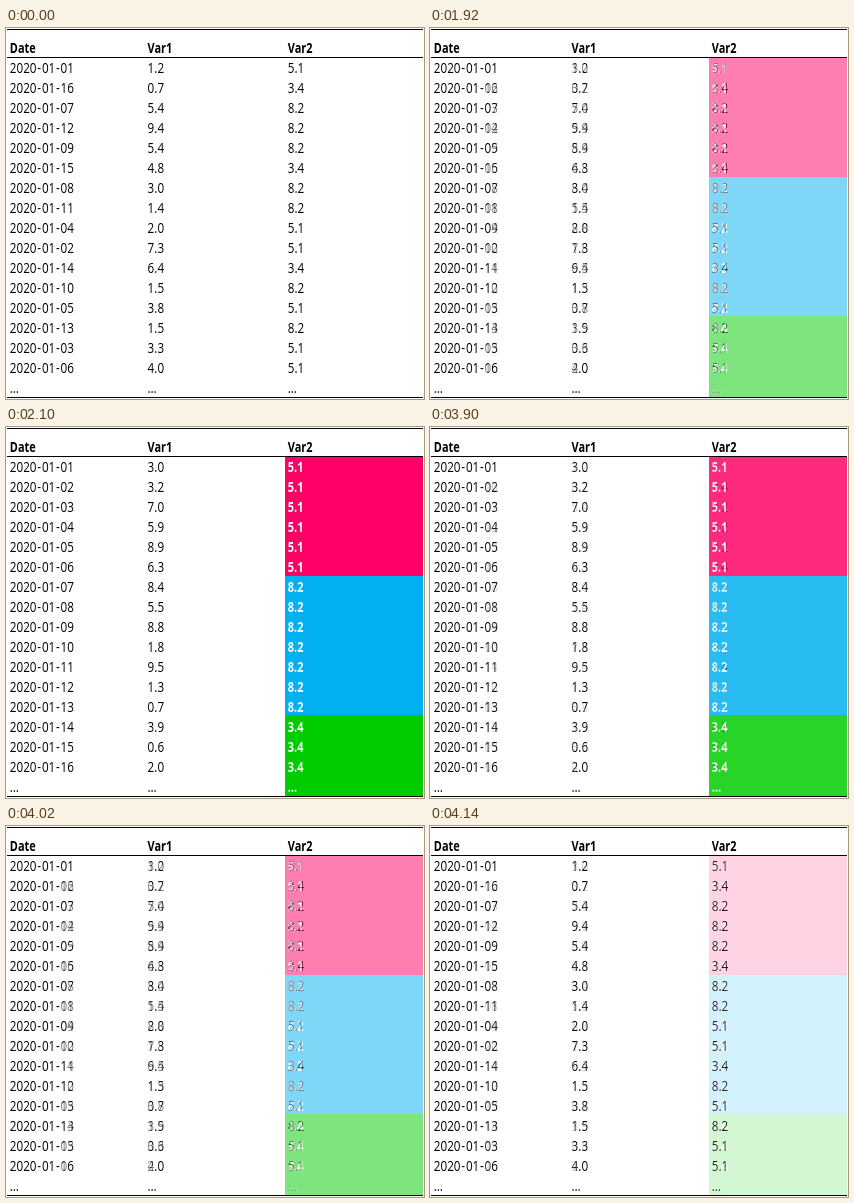
An HTML page for the animation above (4.2 s loop, 418 px wide and 371 px high).

```html
<!DOCTYPE html>
<html lang="en">
<head>
<meta charset="utf-8">
<title>Table sorted and grouped</title>
<style>
  html, body { margin: 0; width: 100%; height: 100%; overflow: hidden; background: #fff; }
  svg { display: block; width: 100%; height: 100%; }
  text { font: 14.6px "Open Sans", "Noto Sans", sans-serif; fill: #000; }
  .bold { font-weight: 700; }
  .light { fill: #fff; }
</style>
</head>
<body>
<svg id="stage" viewBox="0 0 418 371"></svg>
<script>
const NS = "http://www.w3.org/2000/svg";
const stage = document.getElementById("stage");
const COLS = [3.8, 141.6, 281.8];
const ROW = 20, ROWS = 16, FIRST = 45;
const LOOP = 4200, HOLD = 1800, BACK = 3900, STEP = 60, STEPS = 6;

// Seeded generator, values in 0..1.
function seeded(seed) {
  return () => {
    seed = (Math.imul(seed, 1664525) + 1013904223) >>> 0;
    return seed / 2 ** 32;
  };
}

const random = seeded(2020);
const inOrder = Array.from({ length: ROWS }, (_, i) => i + 1);
const shuffled = inOrder
  .map(day => ({ day, key: random() }))
  .sort((a, b) => a.key - b.key)
  .map(item => item.day);

const reading = () => (0.5 + 9.4 * random()).toFixed(1);
const groupValue = day => day <= 6 ? "5.1" : day <= 13 ? "8.2" : "3.4";

function add(parent, tag, attrs, content = "") {
  const el = document.createElementNS(NS, tag);
  for (const key in attrs) el.setAttribute(key, attrs[key]);
  el.textContent = content;
  parent.appendChild(el);
  return el;
}

function rect(parent, x, top, width, bottom, fill) {
  add(parent, "rect", { x, y: top, width, height: bottom - top, fill });
}

// Text is set in a narrow cut of the face.
function label(parent, x, y, str, cls = "", extra = {}) {
  const narrow = cls.includes("bold") ? 0.75 : 0.8;
  add(parent, "text", {
    transform: `translate(${x} ${y}) scale(${narrow} 1)`, class: cls, ...extra
  }, str);
}

function table(parent, days, lastClass) {
  const wideHyphens = { dx: "0 0 0 0 1 1 0 1 1" };
  days.forEach((day, i) => {
    const y = FIRST + i * ROW;
    label(parent, COLS[0], y, "2020-01-" + String(day).padStart(2, "0"), "", wideHyphens);
    label(parent, COLS[1], y, reading());
    label(parent, COLS[2], y, groupValue(day), lastClass);
  });
  COLS.forEach((x, i) =>
    label(parent, x, FIRST + ROWS * ROW, "…", i === 2 ? lastClass : ""));
}

table(stage, shuffled, "");

const overlay = add(stage, "g", { opacity: 0 });
rect(overlay, 0, 30, 418, 369, "#fff");
rect(overlay, 279, 30, 138, 149, "#ff0066");
rect(overlay, 279, 149, 138, 288, "#00b0f0");
rect(overlay, 279, 288, 138, 369, "#00cc00");
table(overlay, inOrder, "bold light");

["Date", "Var1", "Var2"].forEach((name, i) => label(stage, COLS[i], 25, name, "bold"));
[1, 29, 369].forEach(y => rect(stage, 1, y, 416, y + 1, "#000"));

// Share of the sorted table, in hard steps.
function mix(t) {
  const stepsSince = start => Math.min(STEPS, Math.floor((t - start) / STEP) + 1) / STEPS;
  if (t < HOLD) return 0;
  return t < BACK ? stepsSince(HOLD) : 1 - stepsSince(BACK);
}

const start = performance.now();
function tick() {
  overlay.setAttribute("opacity", mix((performance.now() - start) % LOOP));
  requestAnimationFrame(tick);
}
tick();
</script>
</body>
</html>
```
